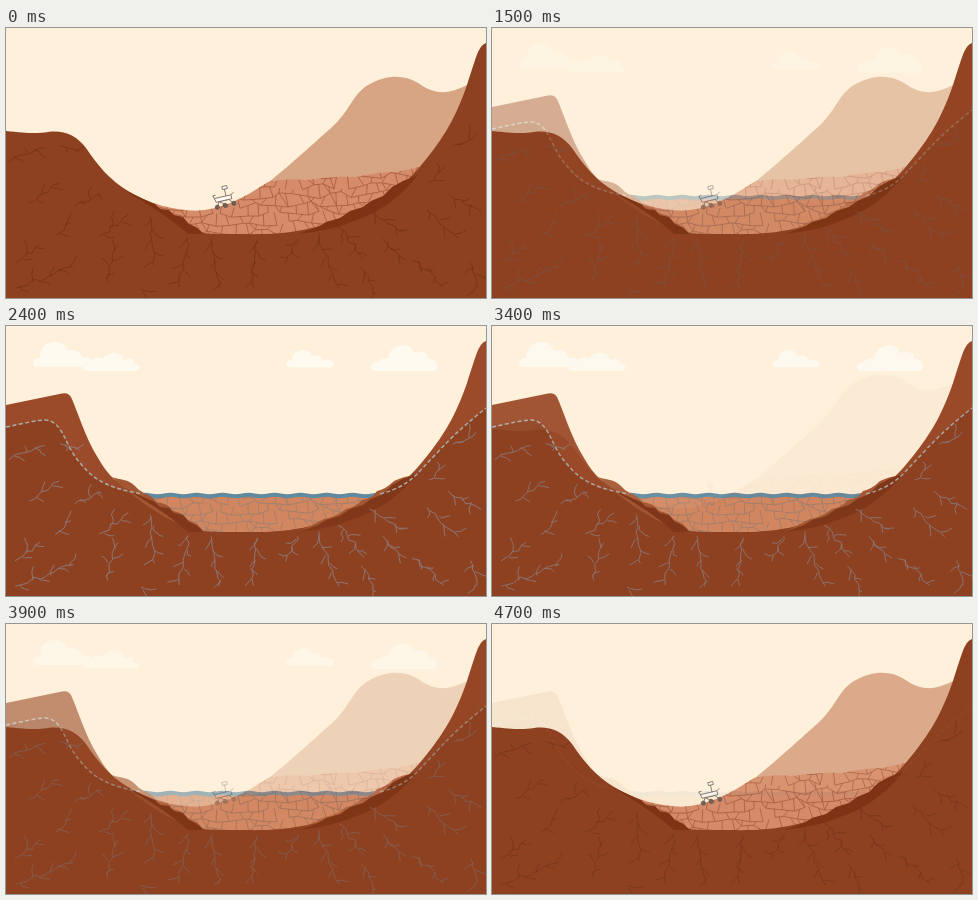
These frames come from a looping animation (480x270 px, 4.8 s). An HTML page:

```html
<!DOCTYPE html>
<html lang="en">
<head>
<meta charset="utf-8">
<title>Crater lake, then and now</title>
<style>
html, body { margin: 0; width: 100%; height: 100%; overflow: hidden; background: #fef0da; }
svg { display: block; width: 100%; height: 100%; }
</style>
</head>
<body>
<svg viewBox="0 0 480 270">
  <defs>
    <path id="basin" d="M0 103C20 105 30 106 42 104C58 102 70 107 80 120C92 138 104 152 122 163C140 173 160 181 180 200C190 206 200 206 235 206C280 207 300 203 340 190C375 175 392 163 412 141C440 108 450 88 461 57C470 30 472 18 480 15V270H0Z"/>
    <path id="fill" d="M112 157C140 176 165 181 185 182.500C210 184 235 172 262 154Q280 150 300 152Q325 148 350 149Q372 144 390 144L414 139V207H112Z"/>
    <path id="lakebed" d="M130 169H395V207H130Z"/>
    <path id="bands" d="M116 161Q134 170 149 176L154 181L163 182L168 187L177 189L183 196L190 199L198 206H182Q160 186 116 161ZM412 147L397 153L386 159L377 168L365 173L357 179L344 183L334 190L320 194L312 199L292 206Q325 203 348 193Q385 181 412 147Z"/>
    <path id="cracks" fill="none"/>
    <path id="tiles" fill="none"/>
    <path id="oldline" fill="none" d="M0 101C20 97 30 94 40 94C58 96 58 120 75 138C90 157 108 163 137 168M374 168C405 160 412 146 430 128C448 108 465 94 480 82"/>
    <clipPath id="inFill"><use href="#fill"/></clipPath>
    <clipPath id="inBed"><use href="#lakebed"/></clipPath>
  </defs>

  <g id="today">
    <path fill="#fef0da" d="M0 0H480V270H0Z"/>
    <path fill="#d8a584" d="M235 174C262 158 300 122 325 100C345 82 345 68 362 57C382 46 398 47 412 55C428 66 440 68 463 56V200H235Z"/>
    <use href="#fill" fill="#d68c6a"/>
    <g clip-path="url(#inFill)"><use href="#tiles" stroke="#ac6042" stroke-width=".9"/></g>
    <use href="#basin" fill="#8e4120"/>
    <use href="#bands" fill="#7d3314"/>
    <use href="#cracks" stroke="#702e14" stroke-width=".7"/>
    <g transform="translate(218 172.500) rotate(-13)" stroke="#5f554f" stroke-width=".7">
      <path fill="none" d="M-8 5L-5 0L0 4M-5 0H5L9 5M3 -4V-12"/>
      <path fill="#fffaf2" d="M-9 -4H8V0H-8ZM1 -14H6V-11H1Z"/>
      <path fill="none" d="M-9 -4L-10 -7H-7M8 -4L11 -6"/>
      <g fill="#6e5f58"><circle cx="-8" cy="5" r="2.100"/><circle cx="0" cy="5" r="2.100"/><circle cx="9" cy="5" r="2.100"/></g>
    </g>
  </g>

  <g id="past" opacity="0">
    <path fill="#fef0da" d="M0 0H480V270H0Z"/>
    <g fill="#fffaf0">
      <path d="M32 41C25 41 25 32 34 32C34 24 38 16 49 16C57 16 61 20 62 25C69 22 75 26 76 32C86 29 91 41 84 41Z"/>
      <path stroke="#fbf0df" stroke-width=".5" d="M81 45C74 45 75 37 83 37C86 31 93 30 97 33C100 25 117 24 118 34C126 30 130 35 128 38C136 38 135 45 130 45Z"/>
      <path d="M284 41.500C278 41 280 34 286 34C286 23 303 20 306 30C313 28 316 31 316 34C329 31 331 41 325 41.500Z"/>
      <path d="M370 45C363 45 363 36 372 36C375 32 379 32 382 33C383 18 404 14 408 27C418 24 423 28 422 33C433 32 434 45 426 45Z"/>
    </g>
    <use href="#lakebed" fill="#d28660"/>
    <g clip-path="url(#inBed)"><use href="#tiles" stroke="#a0806f" stroke-width=".9"/></g>
    <path id="water" fill="#608aa0"/>
    <path fill="#9b4b29" d="M0 79L56 67.500Q62 66 65 71C72 86 78 109 92 132Q100 146 108 153L122 163C140 173 160 181 180 200C190 206 200 206 235 206C280 207 300 203 340 190C375 175 392 163 412 141C440 108 450 88 461 57C470 30 472 18 480 15V270H0Z"/>
    <path fill="#8e4120" d="M0 101C20 97 30 94 40 94C58 96 58 120 75 138C90 157 108 163 130 168C150 176 164 186 180 200C190 206 200 206 235 206C280 207 300 203 340 190Q365 180 386 164C408 156 412 146 430 128C448 108 465 94 480 82V270H0Z"/>
    <path fill="#a35632" d="M106 151C114 154 122 153 129 160Q133 165 138 167Q148 171 150 176Q162 177 167 185Q176 186 182 194Q192 197 198 206Q155 197 106 151ZM408 149Q396 151 388 155Q380 163 371 165Q366 173 356 174Q350 181 340 183Q330 191 318 193L292 206Q350 197 408 149Z"/>
    <use href="#bands" fill="#81381a"/>
    <use href="#cracks" stroke="#8d7d7f" stroke-width=".9"/>
    <use href="#oldline" stroke="#a9aca6" stroke-width="1.500" stroke-dasharray="4 2.500"/>
  </g>
</svg>
<script>
const $ = id => document.getElementById(id);
let seed = 7;
const rand = () => (seed = seed * 16807 % 2147483647) / 2147483647;
const jitter = r => (rand() * 2 - 1) * r;
const line = pts => 'M' + pts.map(p => p.map(v => v.toFixed(1)).join(' ')).join('L');

// A jagged fissure between two points, with short side branches
function crack(x1, y1, x2, y2, depth = 0) {
  const dx = x2 - x1, dy = y2 - y1, len = Math.hypot(dx, dy);
  const n = Math.max(2, Math.round(len / 5));
  const pts = [];
  let d = '';
  for (let i = 0; i <= n; i++) {
    const x = x1 + dx * i / n + jitter(2), y = y1 + dy * i / n + jitter(2);
    pts.push([x, y]);
    if (!depth && i % 2 && i < n) {
      const a = Math.atan2(dy, dx) + (i % 4 == 1 ? 1 : -1) * (.6 + rand() * .5);
      const r = 7 + rand() * 7;
      d += crack(x, y, x + r * Math.cos(a), y + r * Math.sin(a), 1);
    }
  }
  return line(pts) + d;
}

$('cracks').setAttribute('d', [
  [5, 132, 38, 118], [25, 176, 52, 154], [70, 177, 95, 165], [51, 207, 64, 195],
  [10, 234, 33, 218], [10, 260, 68, 239], [93, 208, 122, 188], [100, 253, 111, 217],
  [143, 188, 149, 238], [183, 209, 173, 258], [205, 211, 214, 261], [250, 210, 246, 258],
  [292, 209, 281, 235], [312, 207, 333, 261], [332, 198, 357, 230], [357, 240, 371, 267],
  [364, 184, 399, 205], [376, 210, 399, 234], [408, 232, 438, 259], [420, 182, 451, 210],
  [443, 165, 474, 184], [465, 233, 471, 262], [446, 120, 470, 108], [424, 154, 440, 138],
  [135, 262, 150, 265], [54, 116, 74, 125]
].map(c => crack(...c)).join(''));

// Uneven paving: wavering rows joined by staggered uprights
const node = (c, r) => {
  const h = k => (Math.sin(c * 127.1 + r * 311.7 + k) * 43758.5 % 1);
  return [120 + c * 12 + r % 2 * 6 + h(1) * 4, 136 + r * 9 + h(2) * 3.5 - c * .3];
};
const mid = (a, b) => [(a[0] + b[0]) / 2, (a[1] + b[1]) / 2];
let tiles = '';
for (let r = 0; r < 10; r++) for (let c = -1; c < 26; c++) {
  const a = node(c, r), b = node(c + 1, r);
  if (rand() < .88) tiles += line([a, b]);
  tiles += line([mid(a, b), node(c + r % 2, r + 1)]);
  if (rand() < .2) tiles += line([a, node(c + r % 2, r + 1)]);
}
$('tiles').setAttribute('d', tiles);

$('water').setAttribute('d',
  'M132 167.500' + 'q6.500 -1.600 13 0t13 0'.repeat(10) + 'V171.500' +
  'q-6.500 1.400 -13 0t-13 0'.repeat(10) + 'Z');

// Two held scenes joined by stepped linear cross-fades
function blend(ms) {
  const n = Math.floor(ms % 4800 / 100);
  return Math.max(0, Math.min(1, (n - 9) / 15, (48 - n) / 15));
}
const start = performance.now();
function draw() {
  $('past').setAttribute('opacity', blend(performance.now() - start));
  requestAnimationFrame(draw);
}
draw();
</script>
</body>
</html>
```
